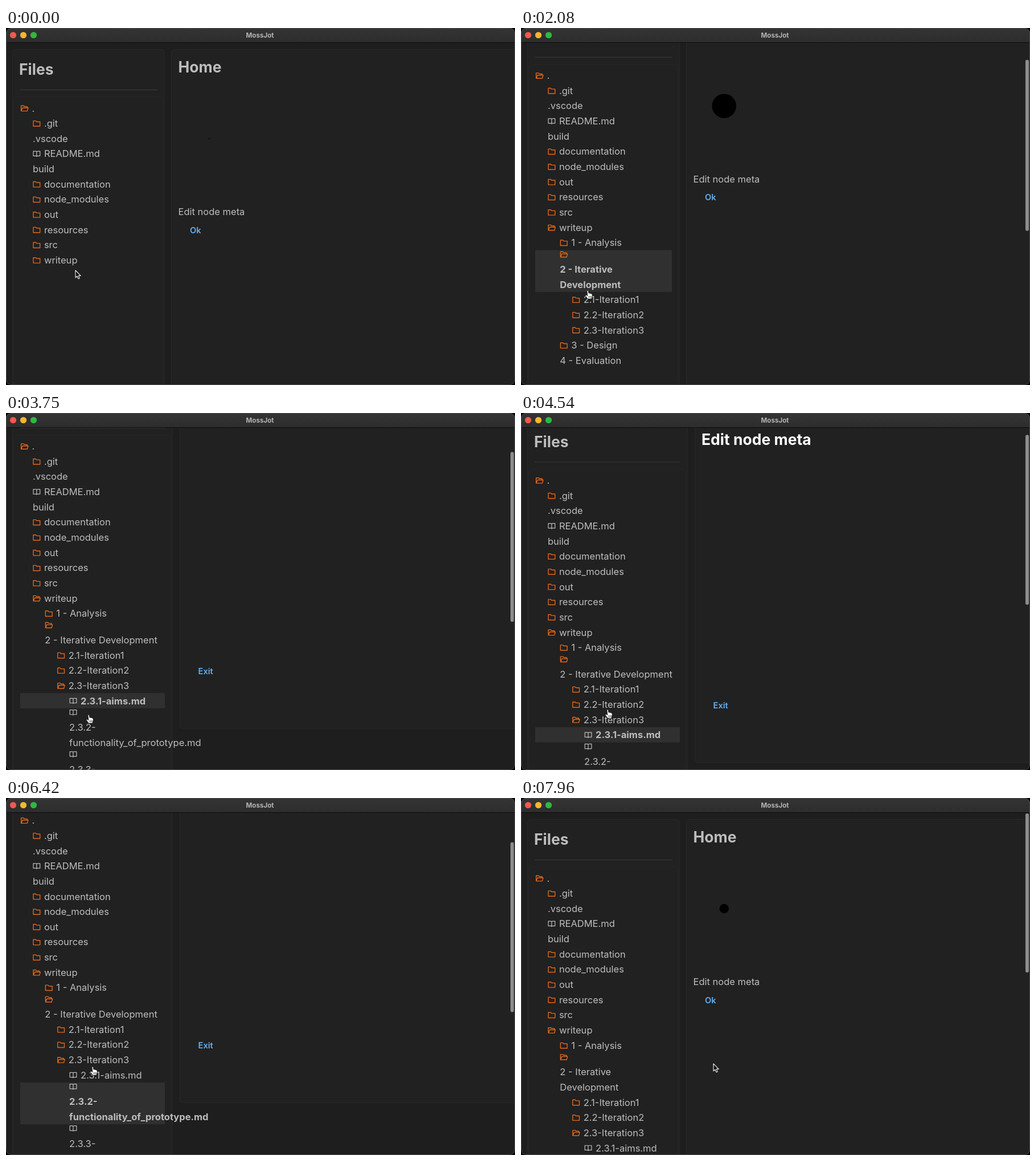
These frames come from a looping animation (894x626 px, 8000 ms). An HTML page:

```html
<!DOCTYPE html>
<html lang="en">
<head>
<meta charset="utf-8">
<title>MossJot</title>
<style>
  html, body { margin: 0; width: 100%; height: 100%; overflow: hidden; background: #000; }
  svg { display: block; width: 894px; height: 626px; }
  text { font-family: Inter, "Open Sans", sans-serif; font-size: 16.5px; fill: #bdbdbd; white-space: pre; }
  .bold { font-weight: 700; }
  .head { font-size: 26.5px; font-weight: 700; }
  .link { font-size: 14.7px; font-weight: 600; fill: #62b0f3; }
  .panel { fill: #212121; stroke: #282828; }
  .pick { fill: #303030; }
  .icon { fill: none; stroke-width: 1.4; stroke-linejoin: round; }
  .folder, .open { stroke: #e0671a; }
  .book { stroke: #bdbdbd; stroke-width: 1.2; }
</style>
</head>
<body>
<svg viewBox="0 0 894 626">
  <defs>
    <linearGradient id="bar" x2="0" y2="1">
      <stop stop-color="#343434"/><stop offset="1" stop-color="#2d2d2d"/>
    </linearGradient>
    <clipPath id="win"><rect width="894" height="626" rx="9"/></clipPath>
    <clipPath id="view"><rect y="26" width="894" height="600"/></clipPath>
    <path id="folder" d="M.7 1.2H5L6.5 2.8H12.4V10.6H.7Z"/>
    <path id="open" d="M.7 10.6V1.2H5L6.5 2.8H11.3V5M.9 10.6L3 5H13L11.4 10.6Z"/>
    <path id="book" d="M.7 1.2H5Q6.5 1.2 6.5 2.6Q6.5 1.2 8 1.2H12.4V9.4H.7ZM6.5 2.6V11"/>
  </defs>
  <g clip-path="url(#win)">
    <rect width="894" height="626" fill="#1e1e1e"/>
    <g clip-path="url(#view)">
      <g id="page">
        <g id="main"></g>
        <g id="side"></g>
      </g>
      <rect id="thumb" x="886" width="6" rx="3" fill="#8c8c8c"/>
    </g>
    <rect width="894" height="25" fill="url(#bar)"/>
    <rect y="25" width="894" height="1" fill="#0b0b0b"/>
    <circle cx="12.5" cy="12.5" r="5.6" fill="#f6574f"/>
    <circle cx="30.5" cy="12.5" r="5.6" fill="#fbb62b"/>
    <circle cx="48.5" cy="12.5" r="5.6" fill="#2cba41"/>
    <text x="446" y="16.5" text-anchor="middle" class="bold" style="font-size:11.6px;fill:#b4b4b4">MossJot</text>
    <rect x=".5" y=".5" width="893" height="625" rx="8.5" fill="none" stroke="#4b4b4b"/>
  </g>
  <g id="cursor">
    <path id="arrow" d="M0 0V12.8L3 10.1L5 14.8L7.2 13.9L5.2 9.4H9.2Z" fill="#111" stroke="#f2f2f2" stroke-width="1.1" stroke-linejoin="round"/>
    <path id="hand" d="M-1.2 .6Q0 -.8 1.2 .6L2 5.2L3.4 4.7L4.4 5.5L5.8 5.2L6.7 6.2L8.2 6.5V10.2L7 15H0L-4 9.2Q-4 7.4 -2.2 8.2L-.2 9.6Z" fill="#fff" stroke="#111" stroke-width=".9" stroke-linejoin="round"/>
    <path id="knuckles" d="M2.2 10V13M4.2 10V13M6 10V13" stroke="#222" stroke-width=".8"/>
  </g>
</svg>
<script>
const LOOP = 8000, LINE = 26.65, TOP = 127;
const CLICK = { writeup: 420, dev: 1300, iter3: 2540, aims: 3200, func: 5630, exit: 7618 };
const $ = id => document.getElementById(id);

// [time, value...]: eased between neighbours
const scrollKeys = [[0, 0], [1620, 0], [2050, 57.3], [2650, 57.3], [2950, 82.3], [3850, 82.3],
  [4450, 22.5], [4560, 22.5], [5000, 132.3], [5715, 132.3], [6210, 102], [6380, 102], [6800, 72.3], [8000, 72.3]];
const cursorKeys = [[0, 122, 425], [120, 122, 425], [380, 106, 408], [880, 106, 408], [1230, 117, 460],
  [2120, 117, 460], [2470, 150, 527], [2650, 150, 527], [3000, 145, 529], [3800, 145, 529],
  [4400, 152, 520], [4600, 152, 520], [5000, 152, 481], [5170, 152, 471], [6850, 152, 471],
  [7350, 338, 466], [8000, 338, 466]];

function sample(keys, t) {
  const i = Math.max(1, keys.findIndex(k => k[0] >= t));
  const a = keys[i - 1], b = keys[i];
  const p = Math.min(1, Math.max(0, (t - a[0]) / (b[0] - a[0])));
  const e = p * p * (3 - 2 * p);
  return a.slice(1).map((v, n) => v + (b[n + 1] - v) * e);
}

function treeRows(s) {
  const row = (depth, icon, id, ...lines) => ({ depth, icon, id, lines });
  const dirs = names => names.map(n => row(1, 'folder', n, n));
  const rows = [row(0, 'open', 'root', '.'), ...dirs(['.git']), row(1, '', 'vs', '.vscode'),
    row(1, 'book', 'readme', 'README.md'), row(1, '', 'build', 'build'),
    ...dirs(['documentation', 'node_modules', 'out', 'resources', 'src']),
    row(1, s.writeup ? 'open' : 'folder', 'writeup', 'writeup')];
  if (!s.writeup) return rows;

  const dev = s.edit ? ['2 - Iterative Development'] : ['2 - Iterative', 'Development'];
  rows.push(row(2, 'folder', 'analysis', '1 - Analysis'),
    { ...row(2, s.dev ? 'open' : 'folder', 'dev', ...dev), wrap: true });
  if (s.dev) rows.push(row(3, 'folder', 'i1', '2.1-Iteration1'), row(3, 'folder', 'i2', '2.2-Iteration2'),
    row(3, s.iter3 ? 'open' : 'folder', 'iter3', '2.3-Iteration3'));
  if (s.iter3) rows.push(row(4, 'book', 'aims', '2.3.1-aims.md'),
    ...[['func', '2.3.2-', 'functionality_of_prototype.md'], ['notes', '2.3.3-', 'annotation_of_code.md'],
      ['tests', '2.3.4-', 'testing.md']].map(r => ({ ...row(4, 'book', ...r), wrap: true })));
  rows.push(row(2, 'folder', 'design', '3 - Design'), row(2, '', 'eval', '4 - Evaluation'));
  return rows;
}

function sideMarkup(s) {
  const right = s.edit ? 292 : 278;
  let y = TOP;
  let out = `<rect class="panel" x="11.5" y="37.5" width="${right - 11.5}" height="1250" rx="5"/>
    <text class="head" x="23" y="82">Files</text>
    <rect x="24" y="108" width="${right - 36}" height="1" fill="#3b3b3b"/>
    <rect x="13.5" y="121" width="${right - 15.5}" height="1150" rx="5" fill="none" stroke="#262626"/>`;
  for (const r of treeRows(s)) {
    const x = 25.5 + 21.4 * r.depth, lead = r.wrap ? 20 : 0;
    const h = lead + LINE * r.lines.length, picked = r.id === s.picked;
    if (picked) out += `<rect class="pick" x="25" y="${y}" width="${right - 38}" height="${h}"/>`;
    if (r.icon) out += `<use href="#${r.icon}" class="icon ${r.icon}" x="${x + .4}" y="${y + (r.wrap ? 1.6 : 8)}"/>`;
    r.lines.forEach((line, i) => {
      const tx = x + (r.icon && !r.wrap ? 20 : 0);
      out += `<text class="${picked ? 'bold' : ''}" x="${tx}" y="${y + lead + LINE * i + 19.5}">${line}</text>`;
    });
    y += h;
  }
  return out;
}

function mainMarkup(s) {
  return s.edit
    ? `<rect class="panel" x="305.5" y="37.5" width="620" height="598" rx="5"/>
       <text class="head" x="317" y="78" style="fill:#fff">Edit node meta</text>
       <text class="link" x="337.5" y="540.5">Exit</text>`
    : `<rect class="panel" x="290.5" y="37.5" width="620" height="1250" rx="5"/>
       <text class="head" x="302.5" y="77.5">Home</text>
       <circle id="node" cx="356.8" cy="194" fill="#000"/>
       <text x="302.5" y="328">Edit node meta</text>
       <text class="link bold" x="323" y="359.5">Ok</text>`;
}

function nodeRadius(age) {
  const p = Math.min(1, Math.max(0, age / 750));
  return 21.3 * (p < .5 ? 4 * p ** 3 : 1 - 4 * (1 - p) ** 3);
}

let shown = '';
function draw(t) {
  const left = t >= CLICK.exit;
  const s = { edit: t >= CLICK.aims && !left, picked: '' };
  for (const id of ['writeup', 'dev', 'iter3', 'aims', 'func']) {
    s[id] = t >= CLICK[id];
    if (s[id]) s.picked = id;
  }
  const key = JSON.stringify(s);
  if (key !== shown) {
    $('side').innerHTML = sideMarkup(s);
    $('main').innerHTML = mainMarkup(s);
    shown = key;
  }
  if (!s.edit) $('node').setAttribute('r', nodeRadius(left ? t - CLICK.exit : t + 170));

  const scroll = left ? 0 : sample(scrollKeys, t)[0];
  $('page').setAttribute('transform', `translate(0 ${-scroll})`);

  const thumb = $('thumb');
  thumb.setAttribute('y', 27 + scroll * .5);
  thumb.setAttribute('height', left ? 279 : s.edit ? 298 : 300);
  const fade = t < 5630 ? Math.min(1, Math.max(0, (5470 - t) / 150)) : 1;
  thumb.setAttribute('opacity', t < CLICK.dev ? 0 : fade);

  const [x, y] = sample(cursorKeys, t);
  $('cursor').setAttribute('transform', `translate(${x} ${y})`);
  const arrow = t < 230 || (t > 7000 && t < 7330) || left;
  $('arrow').style.display = arrow ? '' : 'none';
  $('hand').style.display = $('knuckles').style.display = arrow ? 'none' : '';
}

const start = performance.now();
function tick() {
  draw((performance.now() - start) % LOOP);
  requestAnimationFrame(tick);
}
tick();
</script>
</body>
</html>
```
